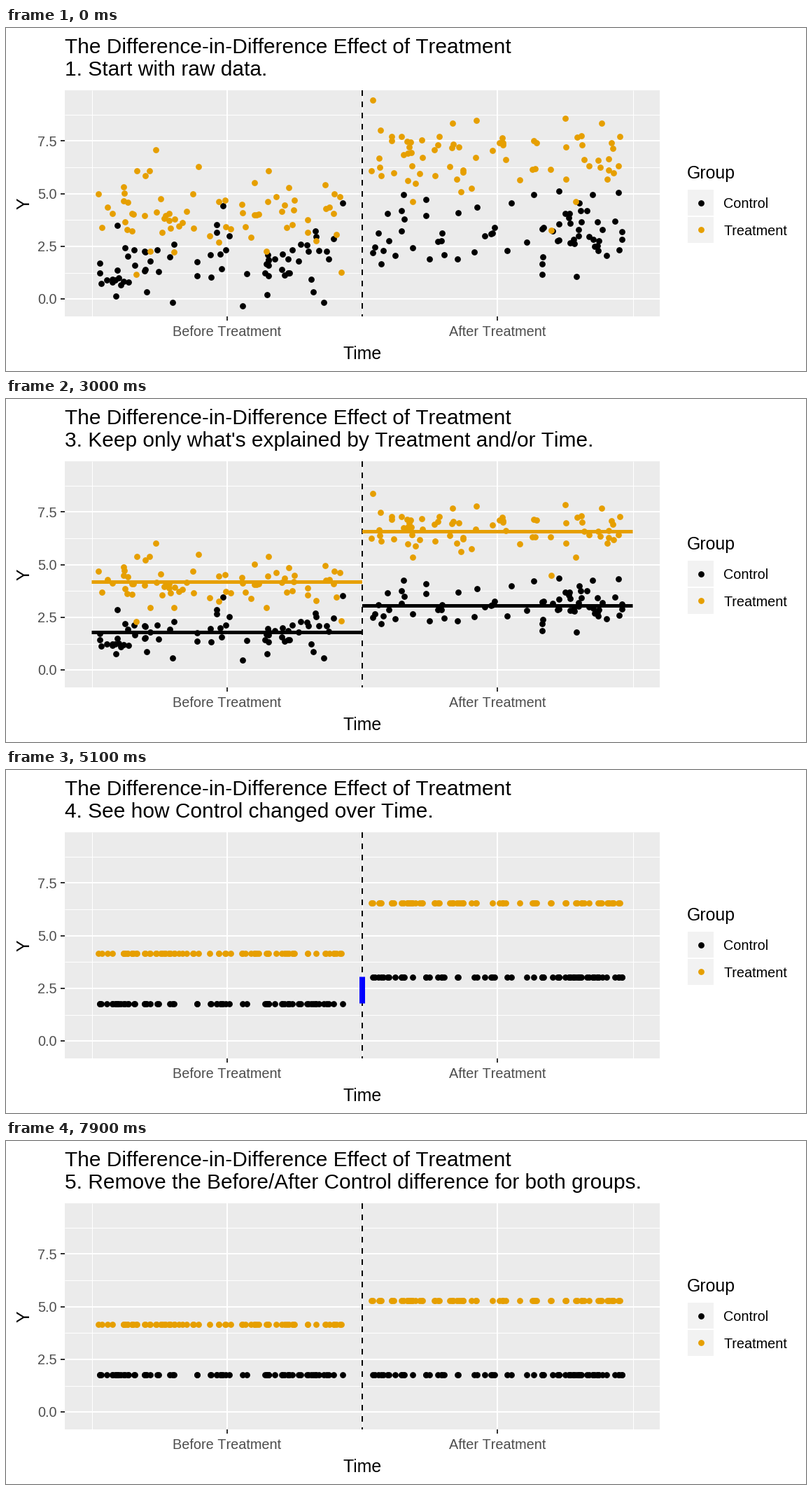
A matplotlib script that plays this animation: 1143 px wide and 490 px high, repeating every 8000 ms.

```python
import math

import matplotlib.pyplot as plt
import numpy as np
from matplotlib.animation import FuncAnimation
from matplotlib.patches import Rectangle

W, H, DPI = 1143, 490, 64
PT = 72 / DPI  # points per pixel
FPS_MS, FRAMES = 100, 80
ORANGE = "#E69F00"
LEFT, MID, RIGHT = 122.5, 509, 895.5
TOP, BOTTOM = 89, 412
BEFORE, AFTER = (132, 481), (519, 882)  # horizontal spread of the points
POINTS_PER_GROUP = 72

# (first frame, caption)
CAPTIONS = [
    (0, "1. Start with raw data."),
    (5, "2. Figure out what differences in Y are explained by Treatment and/or Time."),
    (26, "3. Keep only what's explained by Treatment and/or Time."),
    (47, "4. See how Control changed over Time."),
    (68, "5. Remove the Before/After Control difference for both groups."),
]

plt.rcParams["font.family"] = "Liberation Sans"
plt.rcParams["text.kerning_factor"] = 6

rng = np.random.default_rng(12)

fig = plt.figure(figsize=(W / DPI, H / DPI), dpi=DPI, facecolor="white")
ax = fig.add_axes([0, 0, 1, 1])
ax.set(xlim=(0, W), ylim=(H, 0))
ax.axis("off")


def line(x0, y0, x1, y1, color, width, z, **kw):
    return ax.plot([x0, x1], [y0, y1], color=color, lw=width * PT, zorder=z,
                   solid_capstyle="butt", **kw)[0]


def dots(x, y, color, z=4):
    return ax.plot(x, y, "o", color=color, ms=8.8 * PT, mew=0, zorder=z)[0]


def label(x, y, text, size, color="black", **kw):
    return ax.text(x, y, text, fontsize=size * PT, color=color, **kw)


def y_px(value):
    return 387.2 - 30.12 * value


class Group:
    """Noisy points around a mean, with their mean line."""

    def __init__(self, span, mean, color, z, extremes):
        self.mean, self.after = mean, span is AFTER
        count = POINTS_PER_GROUP - len(extremes)
        noise = np.clip(rng.normal(0, 27, count), -58, 58)
        cloud = np.column_stack([rng.uniform(*span, count), mean + noise])
        self.x, self.y = np.vstack([cloud, extremes]).T
        self.dots = dots([], [], color, z)
        x0, x1 = (MID, RIGHT) if self.after else (LEFT, MID)
        self.line = line(x0, mean, x1, mean, color, 5, 6, snap=False)

    def pose(self, collapse, shift, show_line):
        y = self.y + (self.mean - self.y) * collapse
        self.dots.set_data(self.x, y + shift * self.after)
        self.line.set_visible(show_line)


# Panel, grid and axes
ax.add_patch(Rectangle((84, TOP), 850, BOTTOM - TOP, color="#EBEBEB", lw=0, zorder=0))
for value in (1.25, 3.75, 6.25, 8.75):
    line(84, y_px(value), 934, y_px(value), "white", 1, 1)
for x in (LEFT, MID, RIGHT):
    line(x, TOP, x, BOTTOM, "white", 1, 1)
for value in (0, 2.5, 5, 7.5):
    y = y_px(value)
    line(84, y, 934, y, "white", 2, 2)
    line(78, y, 84, y, "#333333", 2, 2)
    label(73, y + 7.3, f"{value:.1f}", 19.9, "#4D4D4D", ha="right")
for x, name in ((315.7, "Before Treatment"), (702.2, "After Treatment")):
    line(x, TOP, x, BOTTOM, "white", 2, 2)
    line(x, BOTTOM, x, 418, "#333333", 2, 2)
    label(x, 440, name, 19.9, "#4D4D4D", ha="center")
line(MID, TOP, MID, BOTTOM, "black", 2, 5, dashes=(4, 4), dash_capstyle="butt")

label(84, 36, "The Difference-in-Difference Effect of Treatment", 29.9)
caption = label(84, 68, "", 29.9)
label(MID, 473, "Time", 24.9, ha="center")
label(33, 250.5, "Y", 24.9, rotation=90, rotation_mode="anchor", ha="center")

# Legend
label(973, 215, "Group", 24.9)
for y, name, color in ((249.5, "Control", "black"), (288.3, "Treatment", ORANGE)):
    ax.add_patch(Rectangle((974, y - 18.5), 37, 37, color="#F2F2F2", lw=0, zorder=1))
    dots([992.5], [y], color)
    label(1025, y + 7.5, name, 19.9)

# Animated parts
control_before = Group(BEFORE, 333.5, "black", 3,
                       [(310, 254), (481, 250), (338, 397), (238, 392)])
control_after = Group(AFTER, 295.5, "black", 3,
                      [(790, 233), (875, 235), (815, 355), (600, 245)])
treated_before = Group(BEFORE, 261.5, ORANGE, 4,
                       [(214, 174), (275, 198), (186, 352), (479, 349), (132, 237)])
treated_after = Group(AFTER, 189.5, ORANGE, 4,
                      [(524, 103), (799, 129), (851, 136), (638, 136), (779, 289)])
groups = [control_before, control_after, treated_before, treated_after]
gap = control_before.mean - control_after.mean
bar = line(MID, 0, MID, 0, "blue", 8, 7, snap=False)


def eased(frame, start, length=12):
    t = min(max((frame - start) / length, 0), 1)
    return (1 - math.cos(math.pi * t)) / 2


def update(frame):
    collapse = eased(frame, 25)
    shift = eased(frame, 67) * gap
    caption.set_text([text for first, text in CAPTIONS if frame >= first][-1])
    for group in groups:
        group.pose(collapse, shift, 9 <= frame < 47)
    bar.set_ydata([control_before.mean, control_after.mean + shift])
    bar.set_visible(frame >= 51 and shift < gap)
    return [caption, bar]


anim = FuncAnimation(fig, update, frames=FRAMES, interval=FPS_MS,
                     repeat=True, repeat_delay=0, blit=False)
plt.show()
```
